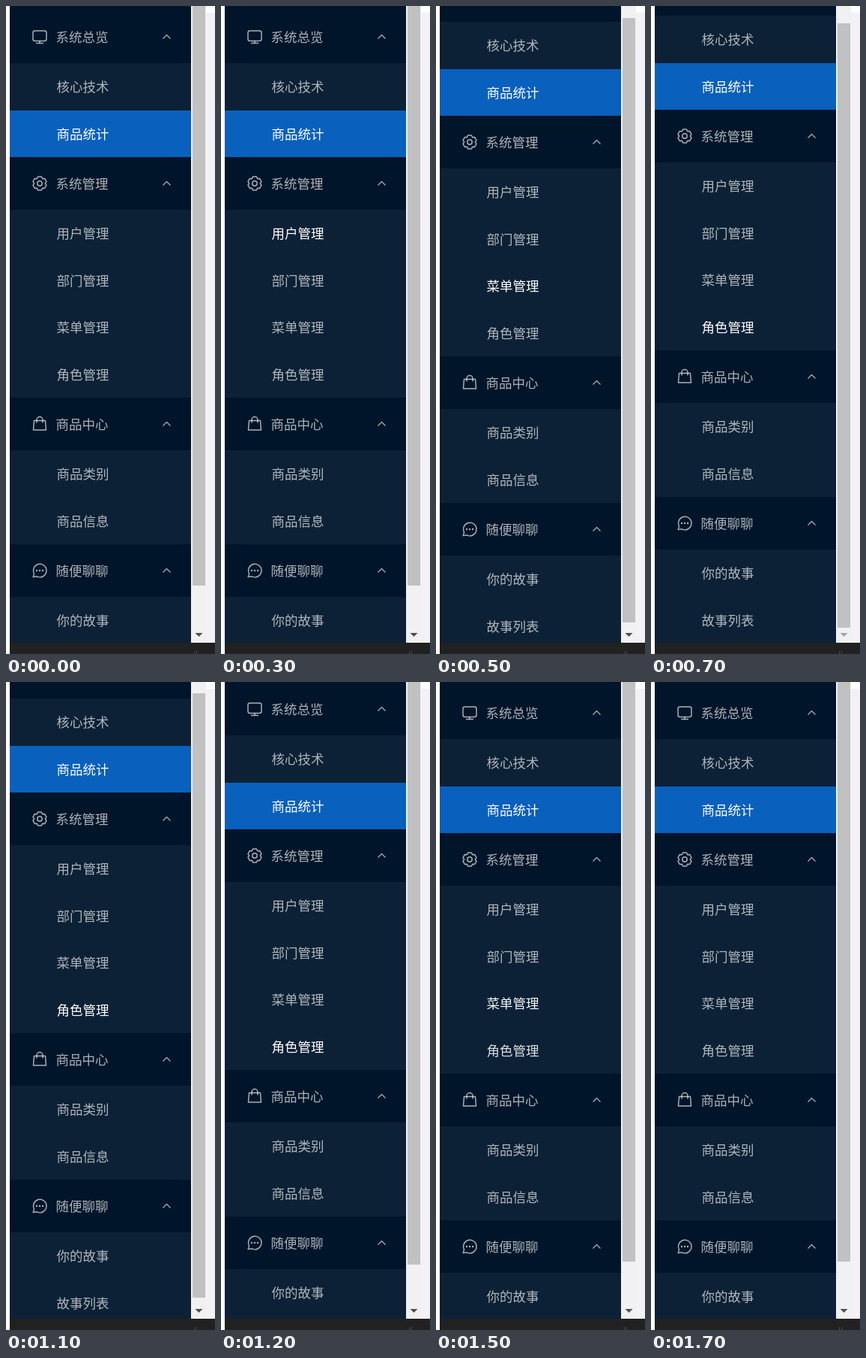
Recreate the animation shown at these times as an HTML page with a canvas. Size 279 by 862 pixels, loop 2300 ms.

```html
<!DOCTYPE html>
<html lang="zh-CN">
<head>
<meta charset="utf-8">
<title>侧边菜单</title>
<style>
html, body { margin: 0; width: 100%; height: 100%; overflow: hidden; background: #fff; }
canvas { display: block; }
</style>
</head>
<body>
<canvas id="stage" width="279" height="862"></canvas>
<script>
const ctx = document.getElementById('stage').getContext('2d');
const LOOP = 2300;
const LEFT = 5, RIGHT = 247, BOTTOM = 847;
const HEAD_H = 70, ITEM_H = 62.5, MAX_SCROLL = 63;
const DIM = 0.67;

const groups = [
  { title: '系统总览', icon: monitor, items: ['核心技术', '商品统计'] },
  { title: '系统管理', icon: gear, items: ['用户管理', '部门管理', '菜单管理', '角色管理'] },
  { title: '商品中心', icon: bag, items: ['商品类别', '商品信息'] },
  { title: '随便聊聊', icon: chat, items: ['你的故事', '故事列表'] }
];
const SELECTED = '商品统计';

// Each step: start time, scroll offset, text opacity of hovered items
const steps = [
  [0, 0, {}],
  [200, 0, { 用户管理: 0.85 }],
  [300, 0, { 用户管理: 1 }],
  [400, 4, { 用户管理: 0.93, 部门管理: 0.95 }],
  [500, 55, { 菜单管理: 1 }],
  [600, 62, { 菜单管理: 0.75, 角色管理: 1 }],
  [700, 63, { 角色管理: 1 }],
  [1100, 54, { 角色管理: 1 }],
  [1200, 5, { 角色管理: 1 }],
  [1300, 0, { 角色管理: 1 }],
  [1500, 0, { 菜单管理: 0.95, 角色管理: 0.85 }],
  [1600, 0, { 菜单管理: 0.85 }],
  [1700, 0, {}]
];

const white = a => `rgba(255,255,255,${a})`;

function rect(x0, y0, x1, y1, color) {
  ctx.fillStyle = color;
  ctx.fillRect(x0, y0, x1 - x0, y1 - y0);
}

function line(points, close) {
  ctx.beginPath();
  points.forEach(([x, y]) => ctx.lineTo(x, y));
  if (close) ctx.closePath();
  ctx.stroke();
}

function circle(x, y, r) {
  ctx.beginPath();
  ctx.arc(x, y, r, 0, Math.PI * 2);
}

function text(str, x, y, alpha) {
  ctx.fillStyle = white(alpha);
  ctx.fillText(str, x, Math.round(y) + 7);
}

// Icons are drawn around their own centre
function monitor() {
  ctx.beginPath();
  ctx.roundRect(-9, -8, 18, 13.5, 2.5);
  ctx.stroke();
  line([[0, 5.5], [0, 8.5]]);
  line([[-5, 8.5], [5, 8.5]]);
}

function gear() {
  const pts = [];
  const add = (deg, r) => {
    const a = deg * Math.PI / 180;
    pts.push([r * Math.cos(a), r * Math.sin(a)]);
  };
  for (let deg = -90; deg < 270; deg += 60) {
    add(deg - 15, 9.3);
    add(deg + 15, 9.3);
    add(deg + 30, 7.3);
  }
  line(pts, true);
  circle(0, 0, 3.2);
  ctx.stroke();
}

function bag() {
  line([[-7.5, -4.5], [7.5, -4.5], [8.5, 8], [-8.5, 8]], true);
  ctx.beginPath();
  ctx.moveTo(-4, -1.5);
  ctx.lineTo(-4, -5.5);
  ctx.arc(0, -5.5, 4, Math.PI, 0);
  ctx.lineTo(4, -1.5);
  ctx.stroke();
}

function chat() {
  ctx.beginPath();
  ctx.arc(0.3, 0, 8.8, 2.65, 2.05 + Math.PI * 2);
  ctx.lineTo(-8.8, 8.6);
  ctx.closePath();
  ctx.stroke();
  ctx.fillStyle = ctx.strokeStyle;
  for (const x of [-4, 0, 4]) {
    circle(x, 0, 1.2);
    ctx.fill();
  }
}

function drawHead(group, mid) {
  ctx.save();
  ctx.translate(45, mid);
  ctx.strokeStyle = white(DIM);
  ctx.lineWidth = 1.45;
  group.icon();
  ctx.lineWidth = 1.2;
  line([[164.5, 2.5], [169.5, -2.5], [174.5, 2.5]]);
  ctx.restore();
  text(group.title, 66.5, mid, DIM);
}

function drawMenu(scroll, hover) {
  ctx.save();
  ctx.beginPath();
  ctx.rect(LEFT, 0, RIGHT - LEFT, BOTTOM);
  ctx.clip();
  rect(LEFT, 0, RIGHT, BOTTOM, '#001529');
  let y = 6 - scroll;
  for (const group of groups) {
    drawHead(group, y + HEAD_H / 2);
    y += HEAD_H;
    for (const item of group.items) {
      const on = item === SELECTED;
      rect(LEFT, Math.round(y), RIGHT, Math.round(y + ITEM_H), on ? '#0960bd' : '#0c2135');
      text(item, 67.5, y + ITEM_H / 2, on ? 1 : hover[item] || DIM);
      y += ITEM_H;
    }
  }
  ctx.restore();
}

function drawScrollbar(scroll) {
  rect(RIGHT, 0, 267, BOTTOM, '#f1f1f1');
  const top = Math.round(-33 + scroll * 56 / MAX_SCROLL);
  rect(249, top, 266, top + 804, '#c1c1c1');
  ctx.fillStyle = scroll < MAX_SCROLL ? '#505050' : '#a3a3a3';
  ctx.beginPath();
  ctx.moveTo(252.5, 834);
  ctx.lineTo(262.5, 834);
  ctx.lineTo(257.5, 839);
  ctx.fill();
}

function drawSurround() {
  rect(0, 0, 279, 862, '#fff');
  rect(267, 9, 279, BOTTOM, '#f1f1f6');
  rect(LEFT, BOTTOM, 279, 862, '#212121');
  rect(251, 858, 252, 862, '#4a4a4a');
  rect(254, 858, 255, 862, '#4a4a4a');
}

function render(t) {
  const [, scroll, hover] = steps.filter(s => s[0] <= t).pop();
  drawSurround();
  drawMenu(scroll, hover);
  drawScrollbar(scroll);
}

ctx.font = '17.5px "Noto Sans CJK SC", "Noto Sans CJK", sans-serif';
ctx.lineJoin = 'round';
const start = performance.now();

function tick() {
  render((performance.now() - start) % LOOP);
  requestAnimationFrame(tick);
}
tick();
</script>
</body>
</html>
```
